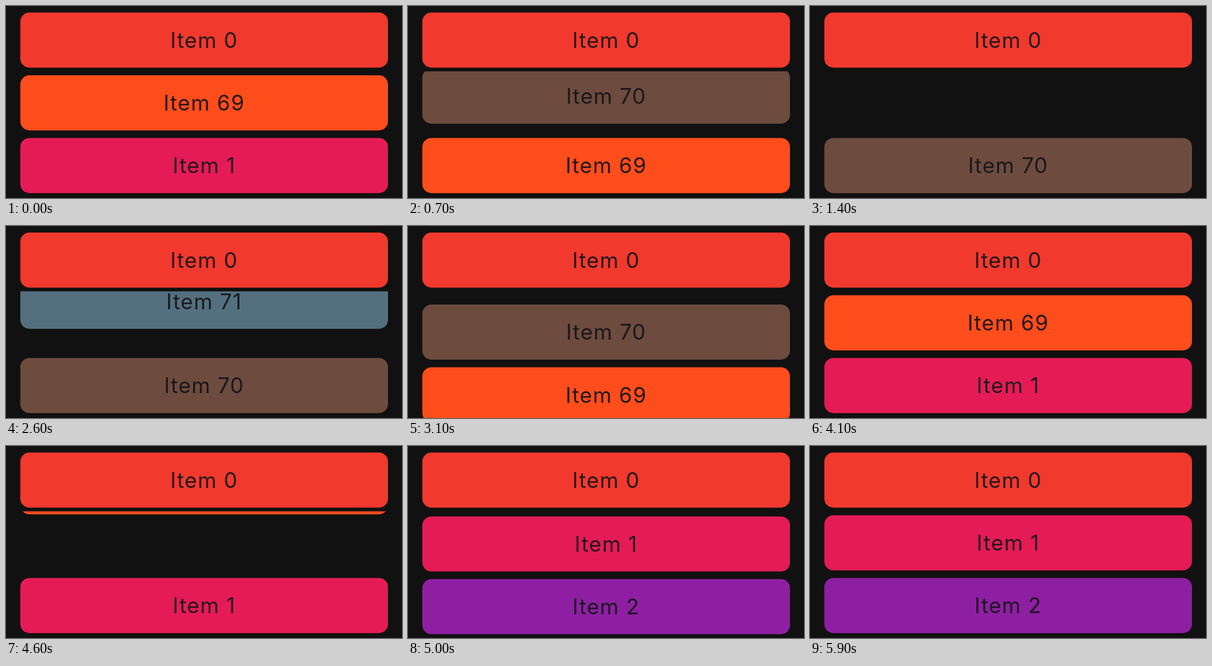
Animation, 650 px wide and 316 px high, one loop 6.1 s. Source, as an HTML page with a canvas:

```html
<!DOCTYPE html>
<html lang="en">
<head>
<meta charset="utf-8">
<title>Animated list</title>
<style>
  html, body { margin: 0; height: 100%; overflow: hidden; background: #111; }
  canvas { display: block; }
</style>
</head>
<body>
<canvas id="stage" width="650" height="316"></canvas>
<script>
const ctx = document.getElementById('stage').getContext('2d');
const LOOP = 6100, RESIZE = 400, SLIDE = 300;
const LEFT = 23.5, WIDTH = 603.5, HEIGHT = 90.7, RADIUS = 15;
const TOP = 10.8, PITCH = 103.2, LIST_TOP = 107.6;

// Rows below the pinned one; times are when a row is inserted or removed.
const pinned = { id: 0, color: '#f1392e' };
const rows = [
  { id: 71, color: '#54707f', insert: 1000, remove: 2498 },
  { id: 70, color: '#6d4b3e', insert: 33, remove: 3400 },
  { id: 69, color: '#ff4d1c', remove: 4333 },
  { id: 1, color: '#e51b56' },
  { id: 2, color: '#8e1fa2' }
];

const progress = (t, start, length) => Math.min(1, Math.max(0, (t - start) / length));
const ease = p => p * p * (3 - 2 * p);

// An inserted row opens its gap, then slides in; removal runs the other way.
function rowState(t, { insert = -LOOP, remove = 2 * LOOP }) {
  return t < remove
    ? { size: ease(progress(t, insert, RESIZE)), shown: progress(t, insert + RESIZE, SLIDE) }
    : { size: 1 - ease(progress(t, remove + SLIDE, RESIZE)), shown: 1 - progress(t, remove, SLIDE) };
}

function drawCard({ id, color }, y) {
  ctx.fillStyle = color;
  ctx.beginPath();
  ctx.roundRect(LEFT, y, WIDTH, HEIGHT, RADIUS);
  ctx.fill();
  ctx.fillStyle = 'rgba(20, 20, 24, .93)';
  ctx.fillText('Item ' + id, 325.3, y + 58.2);
}

function draw(t) {
  ctx.fillStyle = '#111';
  ctx.fillRect(0, 0, 650, 316);
  ctx.font = '35px Inter, sans-serif';
  ctx.letterSpacing = '1.2px';
  ctx.textAlign = 'center';
  drawCard(pinned, TOP);

  ctx.save();
  ctx.beginPath();
  ctx.rect(0, LIST_TOP, 650, 316);
  ctx.clip();
  let y = TOP + PITCH;
  for (const row of rows) {
    const { size, shown } = rowState(t, row);
    if (shown > 0) drawCard(row, y - PITCH * (1 - shown));
    y += PITCH * size;
  }
  ctx.restore();
}

const start = performance.now();
function tick() {
  draw((performance.now() - start) % LOOP);
  requestAnimationFrame(tick);
}
tick();
</script>
</body>
</html>
```
